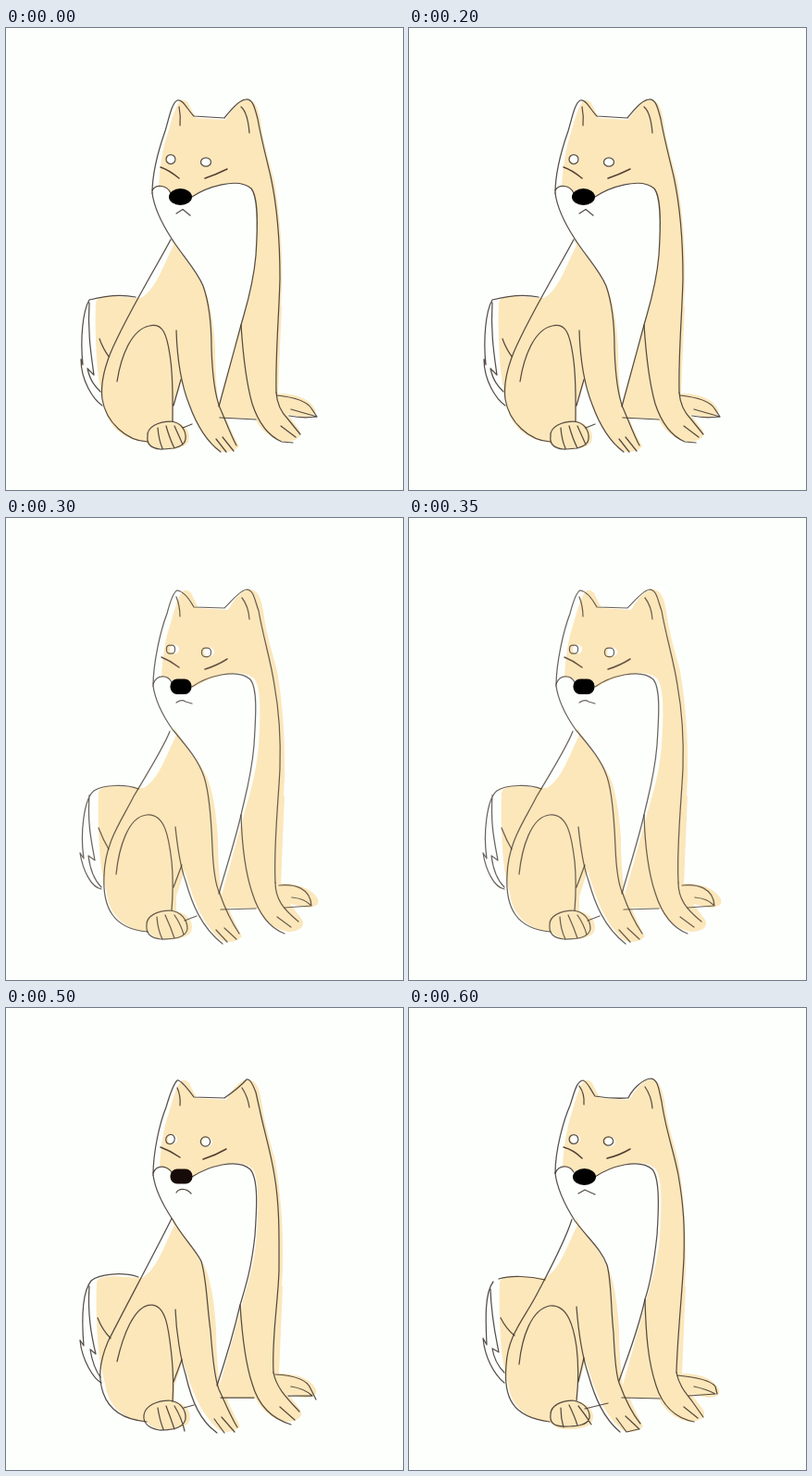
An HTML page for the animation above (0.65 s loop, 429 px wide and 498 px high).

```html
<!DOCTYPE html>
<html lang="en">
<head>
<meta charset="utf-8">
<title>Grumpy dog</title>
<style>
html, body { margin: 0; width: 100%; height: 100%; overflow: hidden; background: #fdfffc; }
svg { display: block; width: 100vw; height: 100vh; }
.pose { visibility: hidden; animation: 650ms step-end infinite; }
.a { animation-name: a; }
.b { animation-name: b; }
.c { animation-name: c; }
.d { animation-name: d; }
/* holds: 250, 150, 150 and 100 ms */
@keyframes a { 0% { visibility: visible; } 38.46%, 100% { visibility: hidden; } }
@keyframes b { 0% { visibility: hidden; } 38.46% { visibility: visible; } 61.538%, 100% { visibility: hidden; } }
@keyframes c { 0% { visibility: hidden; } 61.538% { visibility: visible; } 84.615%, 100% { visibility: hidden; } }
@keyframes d { 0% { visibility: hidden; } 84.615%, 100% { visibility: visible; } }
.ink { fill: none; stroke: #3a3029; stroke-opacity: .85; stroke-width: 1.25; stroke-linecap: round; stroke-linejoin: round; }
.b .ink { stroke-opacity: .75; }
.eyes { stroke: #35231a; stroke-width: 1.5; }
.fur { fill: #fce7bb; }
.white { fill: #fdfffc; }
</style>
</head>
<body>
<svg viewBox="0 0 429 498">
  <defs>
    <g id="coat">
      <path class="fur" d="M165 172C166 150 169 130 175 113C179 98 183 86 187 80Q192 75 197 81L205 97L237 99C246 84 254 76 262 77C271 79 273 90 275 100C278 125 285 145 290 165C296 200 299 240 298 280C296 320 295 350 294 394L231 408L214 278L180 232Z"/>
      <path class="fur" d="M254 318L298 300L294 394C312 394 328 399 334 411Q337 419 322 420L304 416L317 433C321 441 313 446 302 446C287 444 275 433 269 421L231 420L229 405Z"/>
      <path class="fur" d="M182 232L214 278C222 295 226 330 226 355C227 380 230 400 234 411C240 428 247 441 252 451C246 458 233 459 227 453C211 438 204 420 198 405L190 380L181 408V424C193 426 201 436 197 446C192 455 170 455 160 453L150 446C128 444 109 430 106 405L102 388C97 365 96 320 97 296Q98 289 115 289L146 291C162 282 170 256 182 232Z"/>
      <path class="white" d="M158 178C162 168 175 169 180 180L201 182C216 172 250 160 265 173C273 183 272 215 270 245C267 280 258 305 254 320C246 350 236 385 230 407C227 385 226 360 226 345C224 315 220 293 214 279C203 257 190 246 180 228C165 206 159 191 158 178Z"/>
      <circle class="white" cx="179" cy="141.500" r="5"/>
      <ellipse class="white" cx="216.500" cy="144.500" rx="5.500" ry="5"/>
    </g>
  </defs>

  <g class="pose a">
    <use href="#coat"/>
    <g class="ink">
      <path d="M158 178C158 155 166 128 172 111C176 98 179 81 185 78C191 76 196 88 203 95L236 97C240 92 251 77 259 77C267 76 269 87 272 98C275 116 281 139 286 160C293 192 296 232 296 270C295 311 291 352 292 393"/>
      <path d="M187 85Q189 95 188 105M254 85C260 90 262 101 263 113"/>
      <path d="M158 175C162 168 174 169 178 178M201 182C216 172 250 160 265 173C273 183 272 215 270 245C267 280 258 305 254 320C246 350 236 385 230 408"/>
      <path d="M158 178C160 193 166 207 179 227C191 246 206 261 213 278C219 295 222 320 222 345C223 375 226 396 231 409C238 425 243 439 249 450"/>
      <path d="M184 326C185 360 190 386 198 406C206 428 217 446 232 457M227 443L238 457M234 441L246 456"/>
      <path d="M254 320C256 351 259 380 266 405C273 426 284 440 298 446L310 447M292 393C293 407 299 416 305 422L318 438M297 429L313 441"/>
      <path d="M293 396C311 398 325 402 330 410L336 419M308 411L336 419Q320 421 306 418M231 420L270 422M191 431L201 427"/>
      <path d="M178 228C165 253 130 310 113 350C105 370 102 385 104 400C108 425 130 445 153 446"/>
      <path d="M140 290C126 287 109 288 90 293C83 305 80 335 83 363L81 357C81 380 94 400 104 407M90 296C88 328 92 352 95 374L88 367C91 381 97 387 102 392M101 335Q105 346 111 354"/>
      <path d="M120 381C124 355 135 325 155 321C170 317 174 332 177 352C181 376 180 400 180 424M189 379L181 407"/>
      <path d="M153 440C152 430 165 424 178 424C190 425 195 435 194 443C193 452 180 454 167 454C155 453 152 447 153 440ZM164 431Q165 444 169 453M173 429Q177 443 182 453M182 429Q187 440 191 449"/>
      <path d="M184 200L191 195.500L199 202"/>
      <path class="eyes" d="M167 150Q176 153 187 162M215 162Q227 158 239 152"/>
      <circle cx="178" cy="141.500" r="5"/>
      <ellipse cx="216" cy="144.500" rx="5.500" ry="4.700"/>
    </g>
    <ellipse cx="188.500" cy="182" rx="12.500" ry="9"/>
  </g>

  <g class="pose b">
    <use href="#coat" x="3"/>
    <g class="ink">
      <path d="M159 181C159 156 167 121 174 103Q180 80 185 78C192 79 198 87 203 96L236 97C241 93 252 78 260 77C268 77 269 90 273 100C278 129 286 153 290 180C296 213 297 240 296 270C294 310 289 355 291 393"/>
      <path d="M184 85Q188 95 188 106M255 86Q262 95 263 109"/>
      <path d="M159 179C163 168 175 169 179 177M201 182C216 171 250 161 264 174C272 184 270 213 268 245C265 280 258 301 254 320C247 350 237 380 230 405"/>
      <path d="M159 181C161 195 168 211 180 228C196 247 208 261 214 279C220 297 222 330 223 355C224 380 227 397 231 405C238 425 244 436 252 448"/>
      <path d="M183 333C185 352 188 375 194 391C201 416 211 441 234 459M227 444L239 457M236 442L249 454"/>
      <path d="M254 320C255 355 258 380 266 404C273 426 285 442 301 448M291 393C291 411 300 422 316 435M293 430L308 441"/>
      <path d="M295 396C312 394 329 399 330 418L301 420M309 409Q322 410 329 417M232 422L270 421M193 434L206 429"/>
      <path d="M177 230C170 248 151 278 138 300C125 326 107 349 106 385C104 420 116 443 153 446"/>
      <path d="M143 292C130 287 106 287 95 294C84 303 80 340 84 367L80 361C83 380 92 398 103 400M90 299C88 330 92 347 96 369L89 364C91 380 97 392 103 398M100 334Q105 347 111 357"/>
      <path d="M119 384C122 355 132 322 152 320C172 318 176 345 179 370C181 390 180 410 179 423M190 374L181 398"/>
      <path d="M152 438C152 429 164 423 177 423C189 424 196 433 196 443C194 453 181 454 168 454C155 453 151 447 152 438ZM163 430Q164 444 169 454M172 428Q178 441 182 453M182 428Q189 438 192 449"/>
      <path d="M184 199Q190 195 194 198L201 200"/>
      <path class="eyes" d="M168 150Q178 154 187 161M215 163Q228 159 239 152"/>
      <rect x="173.500" y="137" width="9" height="9" rx="3.500"/>
      <rect x="211.500" y="140" width="10" height="9.500" rx="4"/>
    </g>
    <rect x="177.500" y="173.500" width="23" height="16.500" rx="7.500"/>
  </g>

  <g class="pose c">
    <use href="#coat" x="1"/>
    <g class="ink">
      <path d="M159 180C159 155 166 124 173 107Q180 83 185 78Q189 77 203 96L236 97Q252 86 260 77Q264 75 270 91L274 109C279 133 286 155 290 180C296 214 295 250 295 283C294 318 287 355 289 393"/>
      <path d="M185 86Q189 95 188 105M255 86Q261 95 263 107"/>
      <path d="M159 178C163 168 174 170 179 177M201 182C218 171 250 161 264 174C273 185 271 216 269 245C265 283 258 303 253 320C246 350 236 383 228 407"/>
      <path d="M159 180C161 195 168 210 180 228C190 246 205 261 211 273C217 293 217 320 221 348C223 375 225 398 230 411C237 426 243 441 250 452"/>
      <path d="M183 325C184 351 189 379 194 395C201 425 210 445 228 458M225 443L236 458M233 441L247 457"/>
      <path d="M253 320C255 351 258 381 266 405C272 426 285 442 308 449M289 393C292 409 303 420 317 435M296 430L312 444"/>
      <path d="M291 395C311 396 325 400 329 410L335 422M308 408Q322 410 331 418L305 418M232 420L268 420M192 431L203 428"/>
      <path d="M179 227C160 265 125 330 110 360C100 384 100 400 105 415C112 435 130 444 152 446"/>
      <path d="M143 290C125 284 100 287 92 294C81 308 82 340 84 364L80 358C82 380 95 400 103 404M90 300C88 330 92 352 97 373L91 368C93 381 97 391 102 398M99 334Q104 347 113 356"/>
      <path d="M120 381C126 355 138 320 157 320C174 320 176 350 179 375C181 395 181 410 180 424M190 379L181 403"/>
      <path d="M149 439C150 429 163 423 176 423C188 424 195 433 194 443C192 453 180 455 166 455C154 453 148 447 149 439ZM164 431Q166 444 170 454M173 429Q178 442 182 454M182 429Q190 442 193 456"/>
      <path d="M184 199C187 194 195 194 200 200"/>
      <path class="eyes" d="M167 150Q178 154 188 161M213 163Q226 159 238 152"/>
      <ellipse cx="177.500" cy="141.500" rx="4.700" ry="5.300" transform="rotate(25 177.500 141.500)"/>
      <circle cx="215.500" cy="144" r="5.200"/>
    </g>
    <rect x="177.500" y="173.500" width="24" height="16" rx="7.500" fill="#160b08"/>
  </g>

  <g class="pose d">
    <use href="#coat" x="1"/>
    <g class="ink">
      <path d="M158 178C158 153 167 121 174 105C179 90 181 79 188 78C193 79 196 88 201 95Q219 98 237 97C241 88 252 77 261 76C269 76 270 88 273 101C277 130 286 154 291 180C297 214 298 238 297 270C295 310 290 355 289 393"/>
      <path d="M184 84Q190 92 189 104M255 85Q262 95 263 108"/>
      <path d="M158 178C162 168 174 169 178 177M201 182C217 171 249 161 263 174C271 184 270 214 268 245C264 282 259 302 255 314C247 350 236 376 227 402"/>
      <path d="M158 178C160 195 167 210 179 229C193 248 208 260 214 277C219 295 218 325 221 350C222 373 223 393 227 404C234 423 241 437 250 448"/>
      <path d="M181 322C183 348 188 378 194 396C201 420 210 442 228 457M224 442L235 457L248 454M234 440L249 454"/>
      <path d="M255 314C256 351 258 380 267 407C273 426 286 442 308 446M289 393C292 408 300 416 306 424L318 441M297 430L312 442"/>
      <path d="M290 396C311 398 326 401 331 408L333 416M308 408Q322 411 331 416L302 418M230 420L271 421M190 432L215 426"/>
      <path d="M176 228C168 253 151 284 140 305C125 335 107 351 105 385C102 419 111 441 152 446"/>
      <path d="M147 293C130 289 110 288 97 292M91 295C81 308 83 340 84 363L80 356C82 377 92 395 103 404M88 303C89 335 94 355 97 371L90 367C92 380 98 388 103 393M99 334Q105 346 114 353"/>
      <path d="M119 384C122 355 132 325 152 321C172 319 178 345 181 365C184 390 183 406 181 423M189 377L183 403"/>
      <path d="M153 438C153 429 164 423 177 423C189 425 196 433 195 442C193 450 181 451 168 451C155 451 152 446 153 438ZM164 431Q164 442 167 452M173 428Q179 440 182 450M183 429Q191 439 197 449"/>
      <path d="M183 200L190 196L201 201"/>
      <path class="eyes" d="M167 150Q178 153 187 162M214 162Q227 159 239 152"/>
      <circle cx="178" cy="141.500" r="4.900"/>
      <ellipse cx="215.500" cy="143.500" rx="5.200" ry="4.700"/>
    </g>
    <ellipse cx="189.500" cy="182" rx="12.500" ry="9"/>
  </g>
</svg>
</body>
</html>
```
